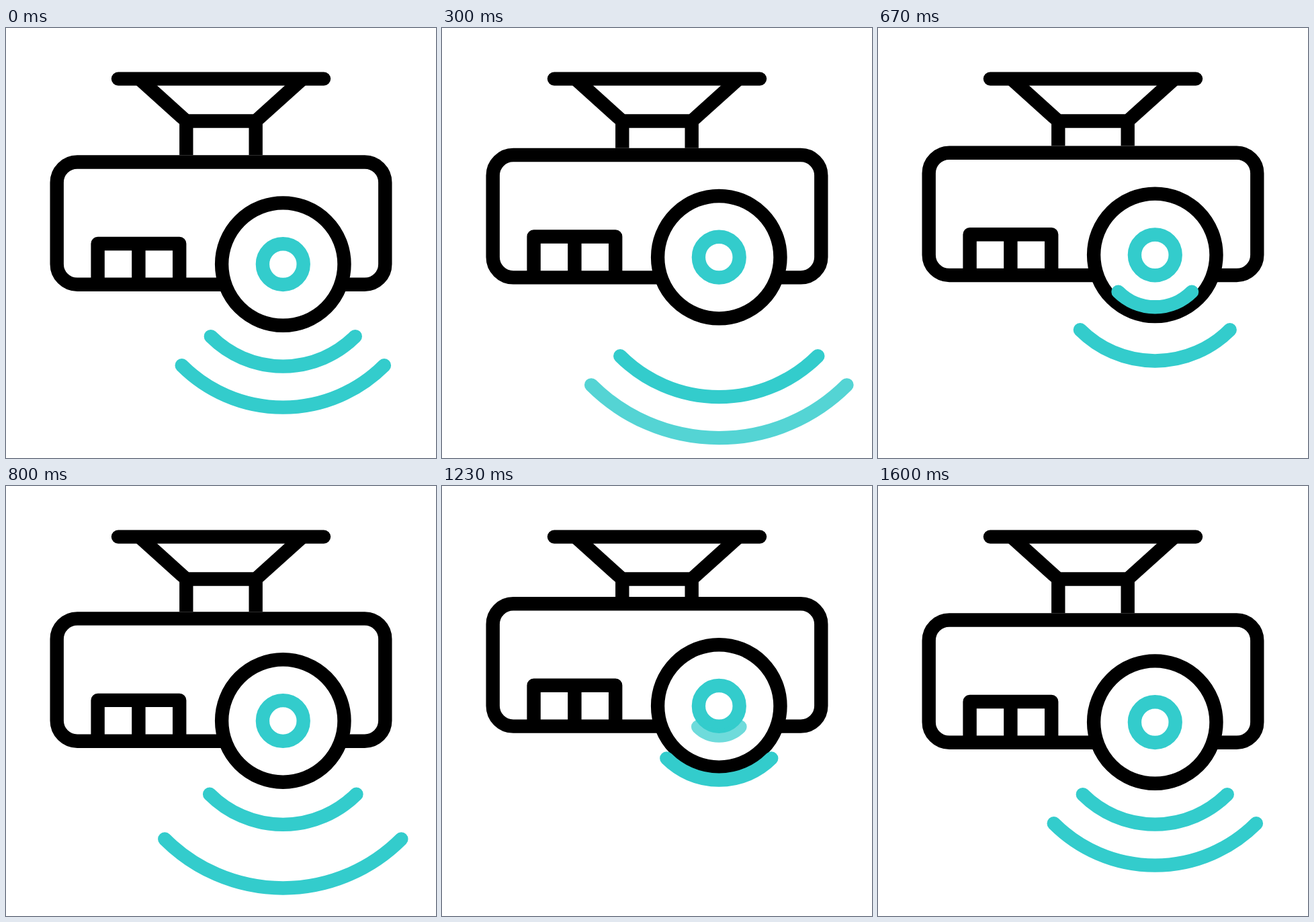
An HTML page for the animation above (1670 ms loop, 640 px wide and 640 px high).

```html
<!DOCTYPE html>
<html lang="en">
<head>
<meta charset="utf-8">
<title>Ceiling projector</title>
<style>
  html, body { margin: 0; width: 100%; height: 100%; overflow: hidden; background: #fff; }
  svg { display: block; width: 100vw; height: 100vh; }
  .line { fill: none; stroke: #000; stroke-width: 20.4; stroke-linejoin: round; }
  .solid { fill: #fff; }
  .teal { stroke: #3cc; }
  .round { stroke-linecap: round; }
</style>
</head>
<body>
<svg viewBox="0 0 640 640">
  <path class="line round" d="M167 75.6H473"/>
  <path class="line" d="M198.5 75.6L268.3 138.5H371.7L441.5 75.6M268.3 215V138.5M371.7 215V138.5"/>
  <g id="body">
    <rect class="solid" x="65.5" y="189.3" width="509" height="202.7" rx="40.6"/>
    <rect class="line" x="75.7" y="199.5" width="488.6" height="182.3" rx="30.4"/>
    <path class="line" d="M136.6 381.8V321H258.2V381.8M197.4 321V381.8"/>
    <circle class="line solid" cx="412.3" cy="351.6" r="91.2" style="fill:#fff"/>
    <circle class="line teal" cx="412.3" cy="351.6" r="30.4"/>
    <path id="outer" class="line teal round"/>
    <path id="inner" class="line teal round"/>
  </g>
</svg>
<script>
  const LOOP = 1670, FPS = 30, LAST = 48;
  const CX = 412.3, CY = 351.6, LENS = 30.4, LIFT = 24.2, FADE = 2.4;

  // Each ripple: start and end step, start and end radius.
  const waves = {
    outer: [[0, 11, 213, 274.3], [12.8, 26.8, LENS, 274.3], [27.7, LAST, LENS, 213]],
    inner: [[0, 14, 152, 231], [15.25, 30.35, LENS, 231], [34.1, LAST, LENS, 152]]
  };
  // Rises and falls of the body: start, end, from, to.
  const lifts = [[4, 15, 0, 1], [15, 26, 1, 0], [27, 37, 0, 1], [37, 48, 1, 0]];

  const $ = id => document.getElementById(id);
  const clamp = v => Math.max(0, Math.min(1, v));
  const ease = s => s * s * (3 - 2 * s);
  const active = (list, n) => list.find(([a, b]) => n >= a && n <= b);
  const tween = ([a, b, from, to], n) => from + (to - from) * ease((n - a) / (b - a));

  function drawWave(id, n) {
    const wave = active(waves[id], n), el = $(id);
    if (!wave) return el.setAttribute('opacity', 0);
    const [a, b] = wave;
    const r = tween(wave, n), k = r * Math.SQRT1_2;
    const fadeIn = a === 0 ? 1 : clamp((n - a - 1.2) / FADE);
    const fadeOut = b === LAST ? 1 : clamp((b - n) / FADE);
    el.setAttribute('d', `M${CX - k} ${CY + k}A${r} ${r} 0 0 0 ${CX + k} ${CY + k}`);
    el.setAttribute('opacity', Math.min(fadeIn, fadeOut));
  }

  function draw(n) {
    const lift = active(lifts, n);
    const y = lift ? -LIFT * tween(lift, n) : 0;
    $('body').setAttribute('transform', `translate(0 ${y})`);
    drawWave('outer', n);
    drawWave('inner', n);
  }

  // Steps fall on whole hundredths of a second.
  function tick() {
    const t = Math.floor(performance.now() % LOOP / 10) * 10;
    draw(Math.min(LAST, Math.floor((t + 4) * FPS / 1000)));
    requestAnimationFrame(tick);
  }
  tick();
</script>
</body>
</html>
```
